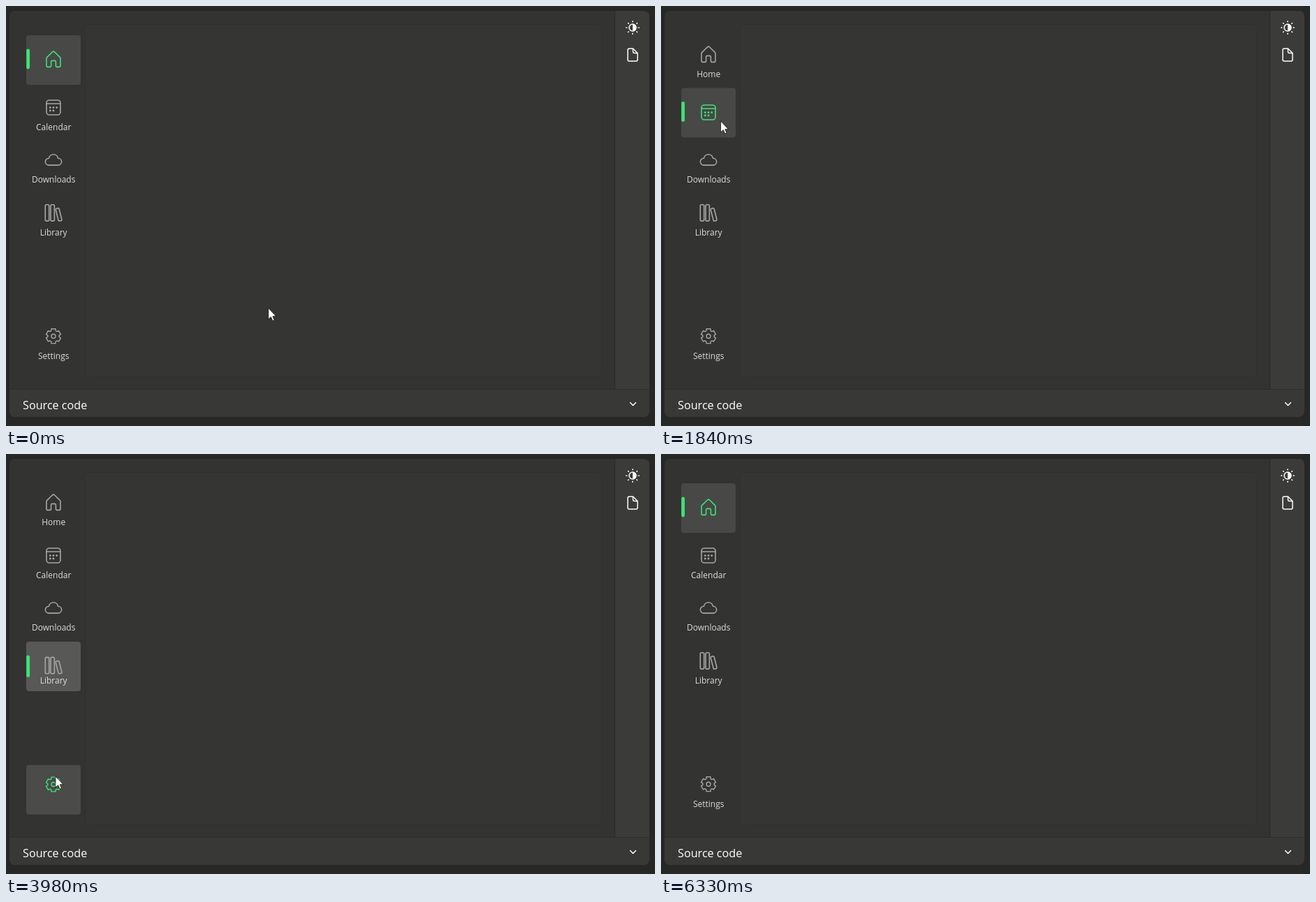
An HTML page for the animation above (6.4 s loop, 930 by 602 pixels).

```html
<!DOCTYPE html>
<html lang="en">
<head>
<meta charset="utf-8">
<title>Navigation</title>
<style>
html, body { margin: 0; width: 100%; height: 100%; overflow: hidden; background: #272726; }
svg { display: block; font: 12px "Open Sans", "Noto Sans", sans-serif; }
.icon { fill: none; stroke-width: 1.6; stroke-linejoin: round; stroke-linecap: round; }
.icon circle.dot { fill: currentColor; stroke: none; }
.tool { fill: none; stroke: #fff; stroke-width: 1.5; stroke-linejoin: round; stroke-linecap: round; }
</style>
</head>
<body>
<svg id="stage" width="930" height="602" viewBox="0 0 930 602">
  <clipPath id="round"><rect x="5" y="7" width="917" height="582" rx="8"/></clipPath>
  <g clip-path="url(#round)">
    <rect width="930" height="602" fill="#333331"/>
    <rect x="113.500" y="26.500" width="740" height="505" rx="6" fill="#353534" stroke="#303030"/>
    <rect x="873" width="57" height="550" fill="#3b3b3a"/>
    <path d="M872.500 0V550" stroke="#282827"/>
    <rect y="550" width="930" height="52" fill="#383837"/>
    <path d="M0 549.500H930" stroke="#2b2b2a"/>
  </g>
  <text x="24" y="577.500" font-size="16.200" fill="#fff">Source code</text>
  <path class="tool" d="M894.500 568.500l4 4 4-4"/>
  <path class="tool" d="M898.500 61H893q-2 0-2 2V77q0 2 2 2h10q2 0 2-2V67.500ZM898.500 61v4.500q0 2 2 2h4.500"/>
  <g transform="translate(898 31)">
    <circle class="tool" r="5"/>
    <path d="M0-5A5 5 0 0 1 0 5Z" fill="#fff"/>
    <g id="rays" class="tool"></g>
  </g>
  <g id="items"></g>
  <rect id="bar" x="29.200" width="4.800" rx="2.400" fill="#3ce377"/>
  <path id="cursor" d="M0 0V16L3.700 12.700 6.100 18.200 8.500 17.200 6.200 11.800H11Z" fill="#fff" stroke="#111" stroke-width=".8"/>
</svg>
<script>
const $ = id => document.getElementById(id);
const polar = (r, deg) => {
  const a = deg * Math.PI / 180;
  return (r * Math.cos(a)).toFixed(2) + ' ' + (r * Math.sin(a)).toFixed(2);
};
const clamp = u => Math.min(1, Math.max(0, u));
const smooth = u => u * u * (3 - 2 * u);
const mix = (a, b, u) => a + (b - a) * u;

const LOOP = 6400, BAR = 29, GREEN = '#3ce377';

const gear = [...Array(6).keys()].map(i => {
  const a = 30 + i * 60;
  return [[8.2, -23], [10.8, -16], [10.8, 16], [8.2, 23]].map(([r, d]) => polar(r, a + d)).join('L');
}).join('L');
const dot = (x, y) => `<circle class="dot" cx="${x}" cy="${y}" r="1.4"/>`;

const items = [
  ['Home', 42, '<path d="M-10-1.200q0-1 .8-1.800l7.800-7.600q1.400-1.300 2.800 0l7.800 7.600q.8 .8 .8 1.800V9q0 2-2 2H5.300q-1.900 0-1.900-2V3.600q0-1.600-1.600-1.600H-1.800q-1.600 0-1.600 1.600V9q0 2-1.900 2H-8q-2 0-2-2Z"/>'],
  ['Calendar', 117.6, '<rect x="-10" y="-10" width="20" height="21" rx="4"/><path d="M-10-5H10"/>' +
    dot(-4.7, .6) + dot(0, .6) + dot(4.7, .6) + dot(-4.7, 5) + dot(0, 5)],
  ['Downloads', 193.3, '<path d="M-6.600-2.400a6.700 6.700 0 0 1 13.200 0h.1a4.900 4.900 0 0 1 0 9.800H-6.700a4.900 4.900 0 0 1 0-9.800Z"/>'],
  ['Library', 269, '<rect x="-11.700" y="-11.700" width="5.400" height="23.400" rx="1.800"/><rect x="-4" y="-11.700" width="5.400" height="23.400" rx="1.800"/>' +
    '<rect x="-2.500" y="-9.200" width="5" height="18.400" rx="1.600" transform="translate(7.600 2.600) rotate(-14)"/>'],
  ['Settings', 445.8, `<path stroke-width="1.4" d="M${gear}Z"/><circle r="3" stroke-width="1.4"/>`]
].map(([name, y, art]) => {
  const g = document.createElementNS('http://www.w3.org/2000/svg', 'g');
  g.innerHTML = `<rect x="29" y="${y}" width="78" height="71" rx="4" fill="#fff"/>
    <g class="icon" stroke="currentColor">${art}</g>
    <text x="68.200" y="${Math.round(y + 60)}" text-anchor="middle">${name}</text>`;
  $('items').append(g);
  const [box, icon, label] = g.children;
  return { y, box, icon, label };
});

$('rays').innerHTML = [...Array(8).keys()]
  .map(i => `<path d="M${polar(8.2, i * 45)}L${polar(9.2, i * 45)}"/>`).join('');

// time, selected item
const clicks = [[-9000, 0], [1180, 1], [2220, 2], [3105, 3], [3955, 4], [5130, 0]];
// time, x, y of the pointer tip
const path = [
  [40, 376, 433], [680, 105, 164], [820, 86, 162], [1800, 86, 162], [2150, 75, 238],
  [2560, 75, 238], [3020, 60, 305], [3330, 60, 305], [3750, 70, 490], [3930, 71, 462],
  [4250, 71, 462], [4760, 52, 95], [5200, 60, 88], [5750, 487, 517]
];
// item index -> moment the pointer leaves it while unselected
const leaves = { 3: 4510, 2: 4586, 1: 4683 };

function bezier(x1, y1, x2, y2, x) {
  const at = (a, b, s) => 3 * s * (1 - s) ** 2 * a + 3 * s * s * (1 - s) * b + s ** 3;
  let lo = 0, hi = 1;
  for (let i = 0; i < 24; i++) {
    const mid = (lo + hi) / 2;
    if (at(x1, x2, mid) < x) lo = mid; else hi = mid;
  }
  return at(y1, y2, lo);
}

function pointer(t) {
  const i = path.findIndex(p => p[0] > t);
  if (i === 0) return path[0].slice(1);
  if (i < 0) return path.at(-1).slice(1);
  const [a, b] = [path[i - 1], path[i]];
  const u = smooth((t - a[0]) / (b[0] - a[0]));
  return [mix(a[1], b[1], u), mix(a[2], b[2], u)];
}

function draw(t) {
  const n = clicks.findLastIndex(c => c[0] <= t);
  const [start, sel] = clicks[n];
  const prev = n ? clicks[n - 1][1] : -1;
  const age = t - start;
  const lift = smooth(clamp(age / 200));
  const fade = clamp(age / 150);
  const flash = .19 * Math.sin(Math.PI * fade);
  const [px, py] = pointer(t);
  const shown = t < 5800;

  items.forEach(({ y, box, icon, label }, i) => {
    const active = i === sel, old = i === prev;
    const hover = shown && !active && px >= 29 && px < 107 && py >= y && py < y + 71;
    let glow = active ? (n ? .1 * fade + flash : .1) : old ? .1 * (1 - fade) + flash : 0;
    const gone = t - leaves[i];
    if (gone >= 0 && gone < 110) glow += .07 * (1 - gone / 110);
    const drop = 7 * (active ? lift : old ? 1 - lift : 0);
    box.setAttribute('opacity', glow);
    icon.setAttribute('transform', `translate(68 ${y + 27.4 + drop})`);
    icon.style.color = active ? GREEN : hover ? '#fff' : '#a6a6a5';
    label.setAttribute('fill', hover ? '#fff' : '#dcdcdb');
    label.setAttribute('visibility', active ? 'hidden' : 'visible');
  });

  // the leading edge stretches to the new item, then the trailing edge follows
  const to = items[sel].y + 19.4;
  const from = n ? items[prev].y + 19.4 : to;
  const lead = mix(from, to, bezier(.9, .1, 1, .2, clamp(age / 200)));
  const trail = mix(from, to, bezier(.1, .9, .2, 1, clamp((age - 200) / 400)));
  $('bar').setAttribute('y', Math.min(lead, trail));
  $('bar').setAttribute('height', BAR + Math.abs(lead - trail));

  $('cursor').setAttribute('transform', `translate(${px} ${py})`);
  $('cursor').setAttribute('visibility', shown ? 'visible' : 'hidden');
}

const begin = performance.now();
function tick() {
  draw((performance.now() - begin) % LOOP);
  requestAnimationFrame(tick);
}
tick();
</script>
</body>
</html>
```
